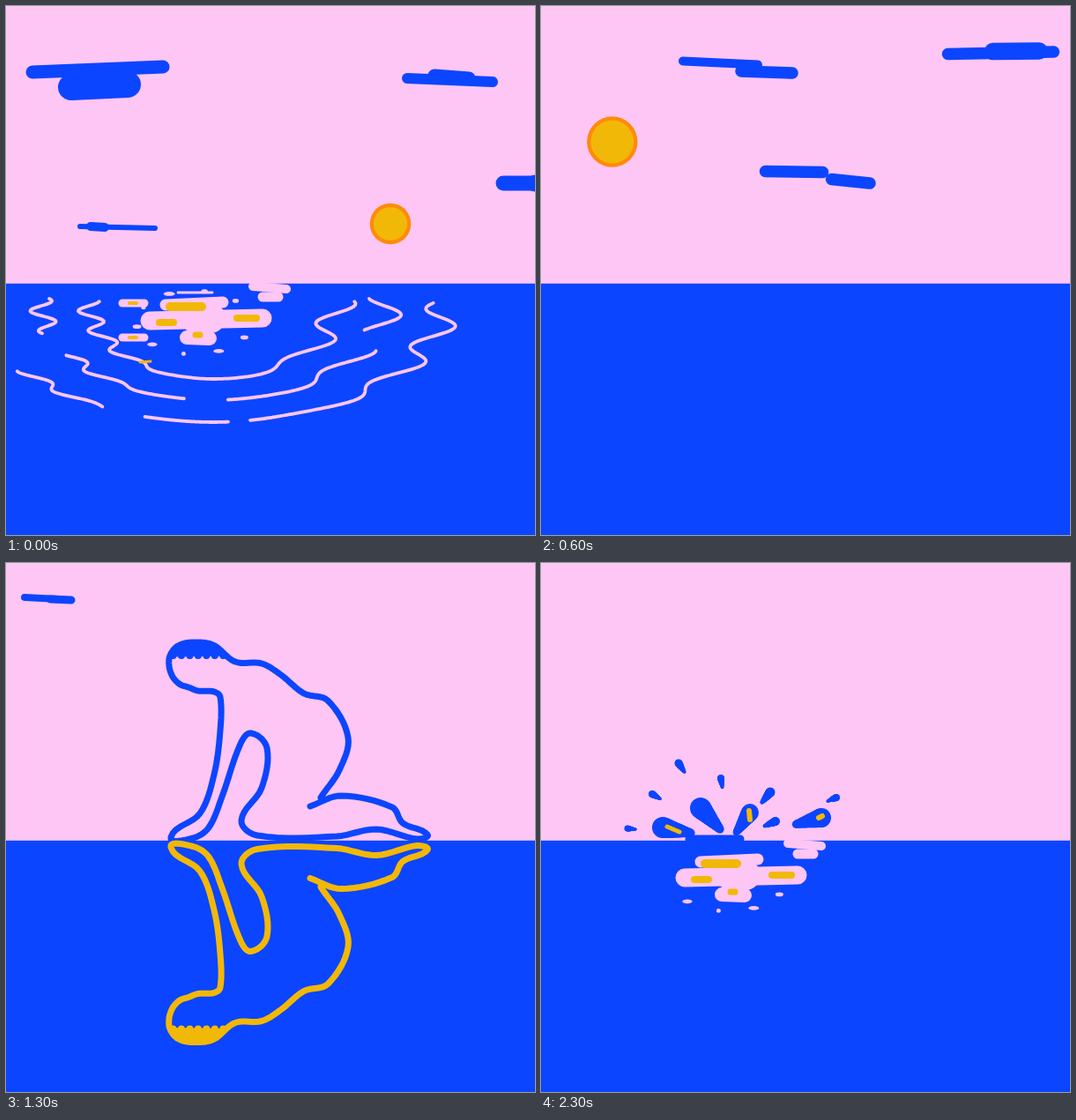
Recreate the animation shown at these times as an HTML page with a canvas. Size 600 by 600 pixels, loop 2400 ms.

```html
<!DOCTYPE html>
<html lang="en">
<head>
<meta charset="utf-8">
<title>Out of the water</title>
<style>
html, body { margin: 0; width: 100%; height: 100%; overflow: hidden; background: #fec6f4; }
canvas { display: block; width: 100vw; height: 100vh; }
</style>
</head>
<body>
<canvas id="stage" width="600" height="600"></canvas>
<script>
const ctx = document.getElementById('stage').getContext('2d');
const PINK = '#fec6f4', BLUE = '#0c45ff', GOLD = '#f2b807', ORANGE = '#ff8a0a';
const STEP = 100, STEPS = 24, HORIZON = 314.8, MIRROR = 633.5;

const lerp = (a, b, t) => a + (b - a) * t;
const mix = (a, b, t) => a.map((v, i) => Array.isArray(v) ? mix(v, b[i], t) : lerp(v, b[i], t));
const scale = (path, cx, cy, sx, sy) => path.map(([x, y]) => [cx + (x - cx) * sx, cy + (y - cy) * sy]);

function trace(path) {
  ctx.beginPath();
  path.forEach(([x, y]) => ctx.lineTo(x, y));
}
function stroke(path, color, width) {
  trace(path);
  ctx.strokeStyle = color;
  ctx.lineWidth = width;
  ctx.stroke();
}
function fill(path, color) {
  trace(path);
  ctx.fillStyle = color;
  ctx.fill();
}
function oval(color, x, y, rx, ry = rx) {
  ctx.beginPath();
  ctx.ellipse(x, y, rx, ry, 0, 0, 7);
  ctx.fillStyle = color;
  ctx.fill();
}
const bar = (color, [x1, y1, x2, y2, w]) => stroke([[x1, y1], [x2, y2]], color, w);

// A trail of circles from one radius to another.
function taper(color, point, r1, r2) {
  for (let t = 0; t <= 1.001; t += 0.04) oval(color, ...point(t), lerp(r1, r2, t));
}

// Rounded line through key points.
function smooth(p) {
  const get = i => p[Math.max(0, Math.min(p.length - 1, i))];
  const dir = i => {
    const a = get(i - 1), b = get(i + 1), d = Math.hypot(b[0] - a[0], b[1] - a[1]) || 1;
    return [(b[0] - a[0]) / d, (b[1] - a[1]) / d];
  };
  const out = [];
  for (let i = 0; i < p.length - 1; i++) {
    const a = p[i], b = p[i + 1], u = dir(i), v = dir(i + 1);
    const m = Math.hypot(b[0] - a[0], b[1] - a[1]);
    for (let t = 0; t <= 1; t += 0.125) {
      const s = 1 - t;
      out.push([0, 1].map(c =>
        a[c] * s * s * (1 + 2 * t) + b[c] * t * t * (3 - 2 * t) + m * t * s * (u[c] * s - v[c] * t)));
    }
  }
  return out;
}

// Each cloud is two bars, x1 y1 x2 y2 width, at a few steps; it keeps its last speed afterwards.
const clouds = [
  { 0: [[30, 75, 178, 69, 15], [74, 92, 138, 89, 30]], 4: [[-60, 78, 41, 79, 15], [-60, 98, 31, 97, 13]] },
  { 0: [[455, 82, 552, 86, 12], [486, 79, 525, 82, 15]], 4: [[302, 66, 402, 71, 11], [369, 81, 398, 82, 10]],
    8: [[20, 59, 90, 62, 9], [85, 67, 172, 70, 17]] },
  { 0: [[564, 201, 680, 201, 17], [600, 201, 660, 201, 19]], 4: [[385, 194, 449, 194, 19], [460, 207, 516, 214, 13]],
    8: [[124, 181, 190, 183, 8], [199, 186, 230, 188, 14]] },
  { 0: [[84, 250, 169, 252, 6], [96, 250, 112, 251, 10]], 4: [[-45, 252, 41, 251, 11], [-20, 252, 0, 252, 12]] },
  { 4: [[571, 60, 660, 57, 14], [595, 55, 640, 55, 20]], 8: [[352, 49, 503, 47, 13], [430, 48, 490, 47, 19]],
    13: [[21, 39, 60, 41, 8], [50, 41, 74, 42, 9]] }
];
function sky(n) {
  for (const keys of clouds) {
    const steps = Object.keys(keys).map(Number);
    let i = 1;
    while (i < steps.length - 1 && n > steps[i]) i++;
    const from = steps[i - 1], to = steps[i];
    mix(keys[from], keys[to], (n - from) / (to - from)).forEach(b => bar(BLUE, b));
  }
  if (n < 8) {
    const x = 436 - 55 * n - 0.7 * n * n, y = 247 - 18.5 * n + 0.5 * n * n, r = 23.3 + 0.9 * n;
    oval(ORANGE, x, y, r);
    oval(GOLD, x, y, r - 4.3);
  }
}

// Rings of water: radii, then arcs in degrees at the start and after four steps.
const rings = [
  { rx: 142, ry: 91, arcs: [[2, 178, 90, 90]] },
  { rx: 196, ry: 115, arcs: [[0, 18, 9, 9], [31, 85, 60, 60], [100, 146, 130, 142], [160, 180, 170, 170]] },
  { rx: 262, ry: 140, arcs: [[2, 80, 31, 86], [86, 107, 97, 97], [119, 144, 132, 132]] },
  { rx: 640, ry: 179, arcs: [[79, 79, 73, 84], [104, 104, 103, 105.4]] }
];
const pool = [[181, 339, 246, 336, 13], [163, 357, 291, 354, 21], [215, 354, 232, 354, 34], [205, 376, 231, 377, 16]];
const puddle = [[270, 366, 310, 367, 6], [295, 368, 337, 369, 12], [310, 368, 337, 369, 13], [300, 368, 330, 369, 12]];
const shine = [[186, 341, 222, 341, 10], [174, 359, 190, 359, 8], [262, 354, 284, 354, 8], [215, 373, 220, 373, 7]];
const glint = [[280, 318, 318, 321, 10], [291, 330, 309, 330, 11]];

function wave({ rx, ry }, i, deg, n) {
  const a = deg * Math.PI / 180, c = Math.cos(a), v = Math.sin(a) * ry, grow = 1 + 0.1 * n;
  const [amp, peak, period] = c > 0 ? [20, 6 + 13 * i, 42] : [13, 14, 23];
  const wobble = amp * Math.cos((v - peak) * 2 * Math.PI / period);
  return [235 + grow * c * (rx + wobble), 332 + grow * v];
}
function flecks(count, n) {
  for (let i = 0; i < count; i++) {
    const a = 0.49 + i * 0.63, far = 1 + 0.15 * n;
    oval(PINK, 213 + 65 * far * Math.cos(a), 359 + 36 * far * Math.sin(a), 4.5 + 2 * Math.sin(i * 2.3), 2.4);
  }
}
function ripples(n) {
  if (n > 4) return;
  const t = n / 4;
  rings.forEach((ring, i) => ring.arcs.forEach(([a0, a1, b0, b1]) => {
    const from = lerp(a0, b0, t), to = lerp(a1, b1, t), path = [];
    for (let k = 0; k <= 150; k++) path.push(wave(ring, i, lerp(from, to, k / 150), n));
    if (to > from) stroke(path, PINK, 3.8 - 0.7 * t);
  }));
  mix(pool, puddle, t).forEach(b => bar(PINK, b));
  if (n < 4) {
    flecks(9 - 3 * n, n);
    shine.forEach(b => bar(GOLD, mix(b, [329, 369, 333, 370, 7], t)));
  } else {
    bar(GOLD, [329, 369, 333, 370, 7]);
    bar(PINK, [325, 386, 342, 385, 3.6]);
  }
  if (n === 0) {
    glint.forEach(b => bar(PINK, b));
    bar(PINK, [195, 325, 234, 325, 2.8]);
    for (const y of [337, 376]) {
      bar(PINK, [132, y, 157, y, 9]);
      bar(GOLD, [140, y, 148, y, 4]);
    }
    bar(GOLD, [152, 404, 164, 403, 3]);
  }
}

// Three poses share the order of their landmarks: foot, knee, arm, head, back.
const pairs = (...flat) => flat.filter((_, i) => i % 2 === 0).map((x, i) => [x, flat[2 * i + 1]]);
const kneel = pairs(345,276, 380,264, 438,277, 450,295, 478,308, 466,313, 420,302, 375,310, 285,309, 267,292, 290,255,
  296,210, 278,193, 266,205, 245,265, 230,300, 212,312, 187,311, 220,284, 236,240, 243,190, 243,152, 236,146, 218,145,
  207,141, 198,138, 192,133, 188,127, 185,117, 186,105, 195,94, 212,90, 235,93, 260,112, 290,114, 312,127, 338,148,
  365,156, 388,198, 378,235, 359,263, 357,266);
const crouch = pairs(394,271, 412,274, 415,287, 424,299, 400,301, 370,303, 335,306, 300,312, 275,307, 270,292, 300,240,
  309,210, 288,191, 272,204, 248,265, 231,299, 213,311, 184,311, 212,289, 235,250, 243,195, 246,150, 238,141, 230,147,
  213,159, 203,161, 192,157, 182,148, 176,135, 174,122, 180,103, 203,91, 230,94, 250,107, 270,119, 310,123, 355,153,
  378,178, 385,205, 370,237, 354,271, 383,272);
const pour = pairs(344,314, 340,304, 333,297, 324,294, 315,293, 308,292, 302,289, 296,285, 290,276, 290,262, 299,238,
  309,203, 298,188, 281,199, 247,260, 240,285, 235,289, 231,278, 235,259, 241,222, 245,175, 243,147, 233,143, 221,165,
  219,214, 204,178, 192,215, 185,179, 159,201, 172,165, 172,130, 182,113, 203,106, 230,119, 280,127, 308,137, 345,183,
  360,212, 361,240, 354,275, 348,298, 348,314);

// Lifts the upper body while hands and knees stay down.
const lift = (path, d) => path.map(([x, y]) => [x, y - d * Math.max(0, Math.min(1, (220 - y) / 90))]);

function pose(n) {
  if (n < 11) return scale(pour, 350, HORIZON, 0.3 * (n - 7), 0.3 * (n - 7) + 0.1);
  if (n < 13) return mix(pour, kneel, n === 11 ? 0.35 : 0.8);
  if (n < 18) return lift(kneel, 5 * Math.min(2, n - 13));
  if (n < 21) return mix(crouch, pour, (n - 18) / 2);
  return scale(pour, 225, HORIZON, 0.75, 0.5);
}
function arm(color) {
  const at = t => [lerp(390, 366, t * t), lerp(310, 256, t)];
  taper(color, at, 7.5, 4.5);
  [200, 242, 280].forEach((deg, i) => {
    ctx.save();
    ctx.translate(367, 254);
    ctx.rotate(deg * Math.PI / 180);
    ctx.beginPath();
    ctx.ellipse(12, 0, 11, i === 1 ? 3.5 : 5, 0, 0, 7);
    ctx.strokeStyle = color;
    ctx.lineWidth = 4.6;
    ctx.stroke();
    ctx.restore();
  });
}
function hair(body, color, edge) {
  const cap = body.filter(([x, y]) => x < 260 && y < edge);
  fill(cap, color);
  const left = cap[0][0] + 4, right = cap[cap.length - 1][0] - 4;
  for (let i = 0; i < 7; i++) oval(color, lerp(left, right, i / 6), edge - 2, 4);
}
function figure(n, color) {
  if (n < 9) {
    const k = n === 7 ? 0.5 : 1;
    ctx.translate(390, HORIZON);
    ctx.scale(k, k);
    ctx.translate(-390, -HORIZON);
    arm(color);
    return;
  }
  const body = smooth(pose(n));
  stroke(body, color, 7);
  if (n > 11 && n < 19) hair(body, color, n > 13 && n < 18 ? 98 : 107);
}
function person(n) {
  if (n < 7 || n > 21) return;
  ctx.save();
  figure(n, BLUE);
  ctx.restore();
  ctx.save();
  ctx.transform(1, 0, 0, -1, 0, MIRROR);
  figure(n, GOLD);
  ctx.restore();
}

// Drops fly out from the point of impact, tails pointing back at it.
const drops = [[138, 300, 12], [181, 278, 12], [237, 283, 10], [318, 289, 11], [156, 227, 4.5], [204, 244, 4],
  [126, 262, 4], [98, 301, 3.5], [260, 260, 5.5], [266, 293, 5], [335, 266, 4]];
function splash(n) {
  if (n < 22) return;
  const k = n === 22 ? 0.6 : 1, cx = 215, cy = 315;
  ctx.save();
  ctx.translate(cx, cy);
  ctx.scale(k, k);
  ctx.translate(-cx, -cy);
  pool.forEach(b => bar(PINK, b));
  flecks(4, 0);
  shine.forEach(b => bar(GOLD, b));
  drops.forEach(([x, y, r]) => {
    const far = Math.hypot(cx - x, cy - y), len = 2.7 * r / far;
    taper(BLUE, t => [lerp(x, cx, len * t), lerp(y, cy, len * t)], r, r * 0.4);
  });
  bar(BLUE, [168, 313, 226, 313, 9]);
  bar(GOLD, [143, 299, 157, 305, 5]);
  bar(GOLD, [236, 281, 237, 291, 6]);
  bar(GOLD, [315, 289, 319, 287, 6]);
  ctx.restore();
  if (n === 23) glint.forEach(b => bar(PINK, b));
}

function draw(n) {
  ctx.fillStyle = PINK;
  ctx.fillRect(0, 0, 600, 600);
  ctx.fillStyle = BLUE;
  ctx.fillRect(0, HORIZON, 600, 600 - HORIZON);
  ctx.lineCap = ctx.lineJoin = 'round';
  sky(n);
  ripples(n);
  person(n);
  splash(n);
}

const start = performance.now();
function tick() {
  draw(Math.floor(Math.max(0, performance.now() - start) / STEP) % STEPS);
  requestAnimationFrame(tick);
}
tick();
</script>
</body>
</html>
```
